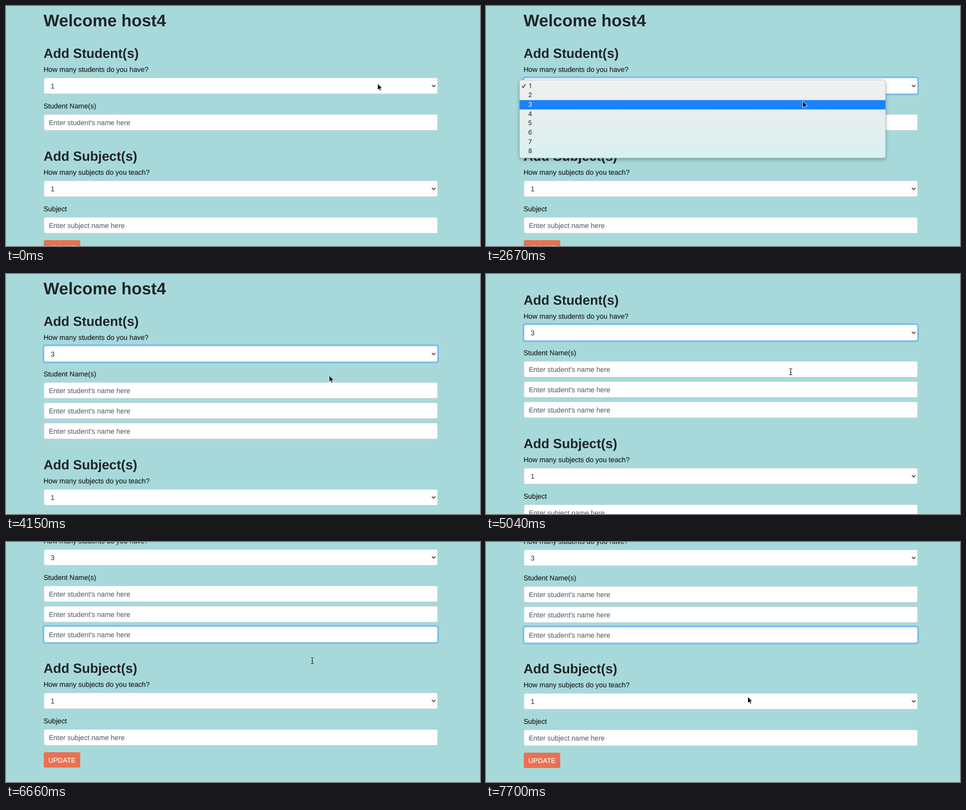
Write an HTML page that moves like this. It is 1053 px wide and 532 px high and loops after 7.99 s.

```html
<!DOCTYPE html>
<html lang="en">
<head>
<meta charset="utf-8">
<title>Class setup form</title>
<style>
  html, body { margin: 0; width: 100%; height: 100%; overflow: hidden; background: #a8d9da; }
  svg { display: block; width: 100vw; height: 100vh; font: 15.48px "Liberation Sans", Arial, sans-serif; }
  text { text-rendering: geometricPrecision; }
  .label { fill: #1e2226; stroke: #1e2226; stroke-width: .2px; }
  .head { fill: #212529; font-weight: bold; }
  .h1 { font-size: 37.2px; }
  .h2 { font-size: 29.5px; }
  .box { fill: #fff; stroke: #ced4da; }
  .value { fill: #454d55; stroke: #454d55; stroke-width: .2px; }
  .hint { fill: #636c75; stroke: #636c75; stroke-width: .2px; }
  .chevron { fill: none; stroke: #343a40; stroke-width: 1.9px; }
  .ring { fill: #7dbfea; }
  .button { fill: #e97151; }
  .caption { fill: #fff; stroke: #fff; stroke-width: .2px; font-size: 15.2px; text-anchor: middle; }
  #menu { font: 14px Inter, sans-serif; text-anchor: middle; }
  #panel { filter: drop-shadow(0 3px 4px rgba(0, 0, 0, .3)); }
</style>
</head>
<body>
<svg id="stage" viewBox="0 0 1053 532" xmlns="http://www.w3.org/2000/svg">
  <defs>
    <linearGradient id="glass" x1="0" y1="0" x2="0" y2="1">
      <stop offset="0" stop-color="#f0f0ef"/>
      <stop offset=".6" stop-color="#e3efee"/>
      <stop offset="1" stop-color="#d8f0f0"/>
    </linearGradient>
  </defs>
  <rect width="1053" height="532" fill="#a8d9da"/>
  <g id="page"></g>
  <g id="menu"></g>
  <path id="arrow" d="M0 0V14.2L3.3 11.2L5.6 16.2L8 15.2L5.8 10.3H10.2Z"
        fill="#000" stroke="#fff" stroke-width="1" stroke-linejoin="round"/>
  <g id="beam" fill="none">
    <path d="M-3.5-7Q-.5-7 0-5.5Q.5-7 3.5-7M0-5.5V5.5M-3.5 7Q-.5 7 0 5.5Q.5 7 3.5 7M-1.8 1.5H1.8" stroke="#fff" stroke-opacity=".6" stroke-width="2.4"/>
    <path d="M-3.5-7Q-.5-7 0-5.5Q.5-7 3.5-7M0-5.5V5.5M-3.5 7Q-.5 7 0 5.5Q.5 7 3.5 7M-1.8 1.5H1.8" stroke="#111" stroke-width="1.2"/>
  </g>
</svg>
<script>
const LOOP = 7990, ROW = 45, ITEM = 20.7;
const $ = id => document.getElementById(id);

function add(parent, tag, attrs, text) {
  const el = document.createElementNS("http://www.w3.org/2000/svg", tag);
  for (const k in attrs) el.setAttribute(k, attrs[k]);
  if (text) el.textContent = text;
  parent.appendChild(el);
  return el;
}
const group = parent => add(parent, "g", {});
const label = (parent, x, y, cls, text) => add(parent, "text", { x, y, class: cls }, text);
const show = (el, on) => el.setAttribute("visibility", on ? "visible" : "hidden");
const place = (el, x, y) => el.setAttribute("transform", `translate(${x} ${y})`);

// A white form field whose centre line is at y
function field(parent, y, cls, x, text) {
  const ring = add(parent, "rect", { x: 81, y: y - 21, width: 881, height: 42, rx: 6, class: "ring" });
  const box = add(parent, "rect", { x: 84.5, y: y - 17.5, width: 874, height: 35, rx: 3.5, class: "box" });
  const value = label(parent, x, y + 5.7, cls, text);
  const caret = add(parent, "rect", { x: 96, y: y - 8.5, width: 1, height: 17, fill: "#111" });
  return { ring, box, value, caret };
}
function select(parent, y) {
  const f = field(parent, y, "value", 99.3, "1");
  add(parent, "path", { d: `M946.3 ${y - 1.8}l3.8 3.8l3.8 -3.8`, class: "chevron" });
  return f;
}

const page = $("page");
label(page, 83.3, 44.7, "head h1", "Welcome host4");
label(page, 83.5, 115, "head h2", "Add Student(s)");
label(page, 83.4, 146, "label", "How many students do you have?");
const count = select(page, 177);
label(page, 83.4, 227, "label", "Student Name(s)");
const rows = [0, 1, 2].map(i => {
  const g = group(page);
  return { g, ...field(g, 258 + i * ROW, "hint", 95.2, "Enter student's name here") };
});

const lower = group(page);
label(lower, 83.5, 343, "head h2", "Add Subject(s)");
label(lower, 83.4, 374, "label", "How many subjects do you teach?");
const fixed = [select(lower, 405)];
label(lower, 83.4, 455, "label", "Subject");
fixed.push(field(lower, 486, "hint", 95.2, "Enter subject name here"));
add(lower, "rect", { x: 84, y: 519, width: 81, height: 34, rx: 3.5, class: "button" });
label(lower, 124.4, 541.5, "caption", "UPDATE");
const fields = [count, ...rows, ...fixed];

const menu = $("menu");
add(menu, "rect", { id: "panel", x: 74.5, y: 164, width: 813, height: 173, rx: 5,
  fill: "url(#glass)", stroke: "#a9b9b9", "stroke-width": .8 });
const bar = add(menu, "rect", { x: 74.5, width: 813, height: ITEM, fill: "#1a82fb" });
const items = [...Array(8).keys()].map(i => label(menu, 98, 181.5 + i * ITEM, "", String(i + 1)));
const tick = add(menu, "path", { d: "M80 177.6l2.6 3.3l4.9 -7.6", fill: "none", "stroke-width": 1.6 });

// The screen only refreshes at these moments: [first, last, steps]
const times = [0];
for (const [a, b, n] of [[450, 1480, 8], [1780, 1920, 2], [2220, 2220, 1], [2520, 2670, 2],
  [3270, 3860, 5], [4150, 5180, 8], [5330, 5330, 1], [5630, 6660, 8], [6810, 7700, 7]])
  for (let i = 0; i < n; i++) times.push(n > 1 ? Math.round((a + (b - a) * i / (n - 1)) / 10) * 10 : a);

// Pointer path: [time, x, y]
const path = [[0, 825.5, 172], [300, 825.5, 172], [1480, 966, 160], [1920, 918, 169.5], [2220, 918, 169.5],
  [2670, 703.5, 211], [3710, 703.5, 211], [4150, 718, 225], [4300, 718, 225], [5040, 677, 216.5],
  [5180, 675, 222], [5330, 673, 243], [5630, 673, 255], [6080, 678, 300], [6220, 679, 298],
  [6660, 680.5, 263], [7700, 581.5, 343]];
const scroll = [[0, 0], [4150, 0], [4890, 47], [6220, 47], [6660, 143], [6810, 142]];

function track(keys, t) {
  const i = keys.findIndex(k => k[0] > t);
  if (i < 0) return keys[keys.length - 1].slice(1);
  const a = keys[i - 1], b = keys[i], u = (t - a[0]) / (b[0] - a[0]), e = u * u * (3 - 2 * u);
  return a.slice(1).map((v, j) => v + (b[j + 1] - v) * e);
}
const within = (t, a, b) => t >= a && t < b;

function draw(ms) {
  const t = times.filter(v => v <= ms).pop();
  const many = t >= 3570;
  place(page, 0, -Math.round(track(scroll, t)[0]));
  place(lower, 0, many ? 2 * ROW : 0);
  count.value.textContent = many ? "3" : "1";
  rows.forEach((r, i) => r.g.setAttribute("display", i && !many ? "none" : "inline"));

  const focus = t < 2220 ? -1 : t < 5180 ? 0 : t < 5630 ? 1 : t < 6080 ? 2 : 3;
  const caret = within(t, 5040, 5630) ? 1 : within(t, 5630, 6080) ? 2 : within(t, 6080, 6510) ? 3 : -1;
  fields.forEach((f, i) => {
    show(f.ring, i === focus);
    f.box.style.stroke = i === focus ? "#80bdff" : "";
    show(f.caret, i === caret);
  });

  menu.setAttribute("display", within(t, 2220, 3710) ? "inline" : "none");
  menu.setAttribute("opacity", many ? .4 : 1);
  const pick = t < 2520 ? 0 : t < 2670 ? 1 : within(t, 3270, 3420) ? -1 : 2;
  show(bar, pick >= 0);
  bar.setAttribute("y", 167.2 + pick * ITEM);
  items.forEach((el, i) => el.setAttribute("fill", i === pick ? "#fff" : "#222"));
  tick.setAttribute("stroke", pick ? "#222" : "#fff");

  const [x, y] = track(path, t), typing = within(t, 4890, 7110);
  place($("arrow"), x, y);
  place($("beam"), x, y);
  show($("arrow"), !typing);
  show($("beam"), typing);
}

const start = performance.now();
function loop() {
  draw((performance.now() - start) % LOOP);
  requestAnimationFrame(loop);
}
loop();
</script>
</body>
</html>
```
